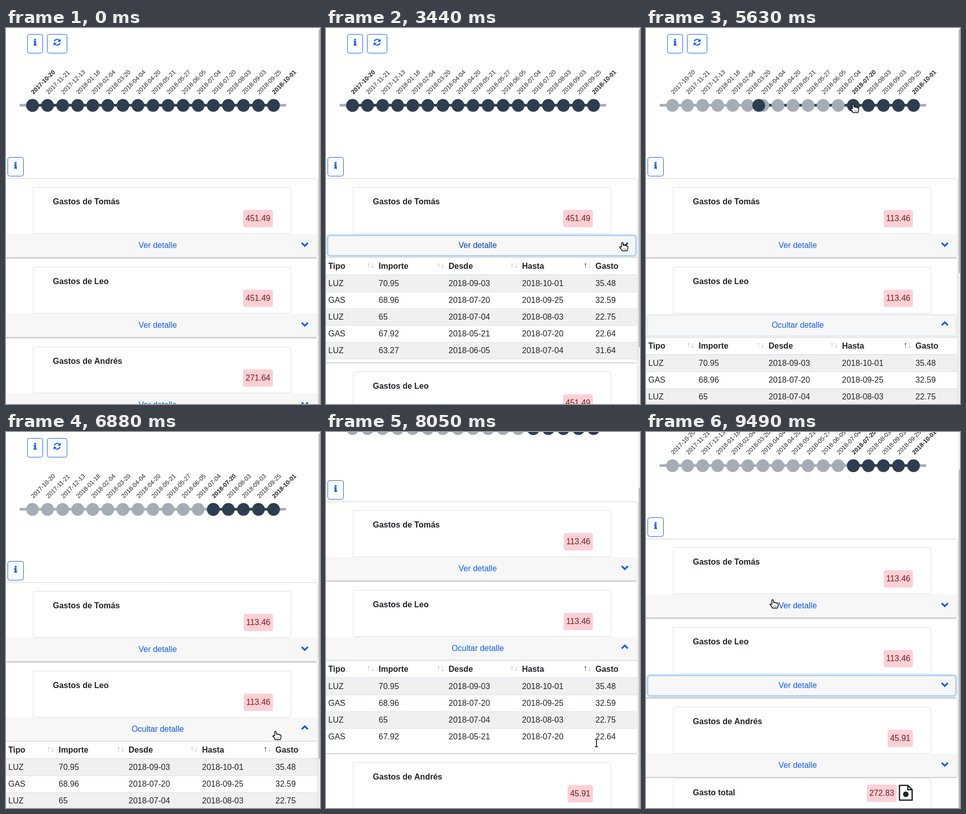
Write an HTML page with a canvas that moves like this. It is 620 by 740 pixels and loops after 9.59 s.

```html
<!DOCTYPE html>
<html lang="es">
<head>
<meta charset="utf-8">
<style>
  html, body { margin: 0; width: 100%; height: 100%; overflow: hidden; background: #fff; }
  canvas { display: block; }
</style>
</head>
<body>
<canvas id="stage" width="620" height="740"></canvas>
<script>
const LOOP = 9590, W = 620, H = 740;
const BLUE = '#0f5ef7', INK = '#212529', NAVY = '#2c3e50', GREY = '#a4acb6', LINE = '#dfdfdf';
const FONT = '"Liberation Sans", Arial, sans-serif';
const ctx = document.getElementById('stage').getContext('2d');

const dates = ('2017-10-20 2017-11-21 2017-12-13 2018-01-18 2018-02-04 2018-03-20 2018-04-04 2018-04-20 ' +
  '2018-05-21 2018-05-27 2018-06-05 2018-07-04 2018-07-20 2018-08-03 2018-09-03 2018-09-25 2018-10-01').split(' ');
const columns = [['Tipo', 4.5], ['Importe', 104], ['Desde', 242], ['Hasta', 387], ['Gasto', 532]];
const rows = [
  'LUZ 70.95 2018-09-03 2018-10-01 35.48',
  'GAS 68.96 2018-07-20 2018-09-25 32.59',
  'LUZ 65 2018-07-04 2018-08-03 22.75',
  'GAS 67.92 2018-05-21 2018-07-20 22.64',
  'LUZ 63.27 2018-06-05 2018-07-04 31.64',
  'LUZ 59.84 2018-05-27 2018-06-05 29.92',
  'GAS 72.15 2018-03-20 2018-05-21 36.08',
  'LUZ 66.41 2018-04-04 2018-05-21 33.21'
].map(r => r.split(' '));
const people = [['Tomás', '451.49', '113.46'], ['Leo', '451.49', '113.46'], ['Andrés', '271.64', '45.91']];

// Pointer path: time, x, y of the pointer's middle
const path = [
  [1130, 577, 416], [1300, 584, 434], [1460, 588, 430], [3700, 588, 430], [4230, 581, 595],
  [4790, 581, 595], [5360, 412, 158], [6210, 412, 158], [6880, 535, 596], [7060, 517, 724],
  [7180, 517, 724], [7400, 517, 532], [7910, 517, 532], [8260, 560, 730], [8450, 565, 725],
  [8840, 588, 434], [8960, 593, 426], [9200, 593, 426], [9490, 253, 338]
];

const clamp = v => Math.max(0, Math.min(1, v));
const lerp = (a, b, p) => a + (b - a) * p;
const ramp = (t, start, length) => clamp((t - start) / length);

// cubic-bezier(.25, .1, .25, 1)
function ease(x) {
  if (x <= 0 || x >= 1) return clamp(x);
  let lo = 0, hi = 1, u;
  for (let i = 0; i < 16; i++) {
    u = (lo + hi) / 2;
    if (.75 * u * (1 - u) + u ** 3 < x) lo = u; else hi = u;
  }
  return .3 * u * (1 - u) ** 2 + 3 * u * u * (1 - u) + u ** 3;
}
const easeAt = (t, start, length) => ease(ramp(t, start, length));

const isOpen = (i, t) => i === 0 ? t >= 2110 && t < 3320 : i === 1 && t >= 4420 && t < 9165;
const rowCount = t => t < 6210 ? 14 : 4;

function panelHeight(i, t) {
  const full = 50 + 33 * rowCount(t);
  if (i === 0) return t < 2110 ? 0 : full * (easeAt(t, 2099, 350) - easeAt(t, 3320, 350));
  if (i === 1) return t < 4420 ? 0 : full * (easeAt(t, 4409, 350) - easeAt(t, 9165, 350));
  return 0;
}

function focusRing(i, t) {
  if (i === 0) return t < 2110 || t >= 4420 ? 0 : t < 4270 ? 1 : .15;
  if (i === 2 || t < 4270) return 0;
  if (t < 4420) return .25;
  if (t < 9110) return 1 - ramp(t, 5490, 150);
  return .12 + .88 * ramp(t, 9150, 130);
}

function scrollTop(t) {
  const wheel = 159 * (1 - (1 - ramp(t, 7180, 340)) ** 4);
  return Math.round(t < 9110 ? wheel : Math.min(wheel, 86 + Math.round(panelHeight(1, t))));
}

function pointer(t) {
  if (t < path[0][0]) return null;
  const k = path.findIndex(p => p[0] > t);
  if (k < 0) return path[path.length - 1].slice(1);
  const [t0, x0, y0] = path[k - 1], [t1, x1, y1] = path[k], p = (t - t0) / (t1 - t0);
  return [lerp(x0, x1, p), lerp(y0, y1, p)];
}

function cardTop(i, t) {
  let y = 296;
  for (let k = 0; k < i; k++) y += 157 + Math.round(panelHeight(k, t));
  return y;
}

function over(i, t) {
  const p = pointer(t);
  if (!p) return false;
  const y = p[1] + scrollTop(t) - cardTop(i, t);
  return y > 109 && y < 156;
}

function hover(i, t) {
  let sum = 0;
  for (let k = 1; k <= 6; k++) sum += over(i, t - 25 * k);
  return sum / 6;
}

function text(s, x, y, color = INK, bold = false, align = 'left', size = 16) {
  ctx.font = `${bold ? 'bold ' : ''}${size}px ${FONT}`;
  ctx.textAlign = align;
  ctx.fillStyle = color;
  ctx.fillText(s, x, y);
}
function rect(x, y, w, h, color) {
  ctx.fillStyle = color;
  ctx.fillRect(x, y, w, h);
}
function box(x, y, w, h, r, stroke, fill, width = 1) {
  ctx.beginPath();
  ctx.roundRect(x, y, w, h, r);
  if (fill) { ctx.fillStyle = fill; ctx.fill(); }
  if (stroke) { ctx.strokeStyle = stroke; ctx.lineWidth = width; ctx.stroke(); }
}
function disc(x, y, r, color) {
  ctx.beginPath();
  ctx.arc(x, y, r, 0, 7);
  ctx.fillStyle = color;
  ctx.fill();
}
function shape(d, x, y, stroke, width, fill) {
  const p = new Path2D(d);
  ctx.save();
  ctx.translate(x, y);
  if (fill) { ctx.fillStyle = fill; ctx.fill(p); }
  if (stroke) { ctx.strokeStyle = stroke; ctx.lineWidth = width; ctx.stroke(p); }
  ctx.restore();
}

function infoButton(x, y, w) {
  box(x + .5, y + .5, w - 1, 37, 4, BLUE);
  const cx = x + w / 2;
  disc(cx, y + 11.2, 2, BLUE);
  shape('M-3 -3H1.8V3.7H3V6H-3V3.7H-1.8V-.7H-3Z', cx, y + 16.7, null, 0, BLUE);
}

function refreshButton() {
  box(81.5, 12.5, 39, 37, 4, BLUE);
  shape('M-5.6 -1.2A5.6 5.6 0 0 1 4.4 -3.4M5.6 1.2A5.6 5.6 0 0 1 -4.4 3.4', 101, 28, BLUE, 2);
  shape('M7 -7V-1H1ZM-7 7V1H-1Z', 101, 28, null, 0, BLUE);
}

function timeline(t) {
  const first = t < 5490 ? 0 : 12, dotX = i => 52.3 + 29.75 * i;
  const left = lerp(dotX(0), dotX(12), easeAt(t, 5490, 500));
  rect(27, 149.5, 526, 5, GREY);
  rect(left, 149.5, dotX(16) - left, 5, NAVY);
  dates.forEach((d, i) => {
    disc(dotX(i), 152.3, 12.5, i < first ? GREY : NAVY);
    ctx.save();
    ctx.translate(dotX(i) + 2, 131);
    ctx.rotate(-Math.PI / 4);
    text(d, 0, 0, INK, i === first || i === 16, 'left', 12);
    ctx.restore();
  });
  disc(left, 152.3, 12.5, NAVY);
}

function badge(value, right, y) {
  ctx.font = `16px ${FONT}`;
  const w = ctx.measureText(value).width + 10;
  box(right - w, y, w, 34, 4, null, '#fdd0d6');
  text(value, right - 5, y + 22, '#721c24', false, 'right');
}

function table(y, count) {
  columns.forEach(([name, x], i) => {
    text(name, x, y + 22, INK, true);
    if (i === 0) return;
    text('↑', x - 24, y + 20, i === 4 ? INK : '#b4b4b4');
    text('↓', x - 16, y + 20, '#b4b4b4');
  });
  rect(0, y + 33, 615, 1.5, '#cfe2f3');
  rows.slice(0, count).forEach((r, i) => {
    const top = y + 35 + 33 * i;
    if (i % 2 === 0) rect(0, top, 615, 32, '#f0f0f0');
    if (i) rect(0, top - 1, 615, 1, '#d3e4f3');
    r.forEach((cell, c) => text(cell, columns[c][1], top + 21));
  });
}

function card(i, t) {
  const y = cardTop(i, t), extra = Math.round(panelHeight(i, t));
  const [name, before, after] = people[i];
  const h = hover(i, t), ring = focusRing(i, t);
  const color = `rgb(${lerp(15, 8, h)},${lerp(94, 66, h)},${lerp(247, 178, h)})`;

  box(-4.5, y + .5, 620, 156 + extra, 4, '#d4d4d4', '#fff');
  box(53.5, y + 17.5, 509, 91, 3, LINE);
  text('Gastos de ' + name, 92.5, y + 51, INK, true);
  badge(t < 5490 ? before : after, 527, y + 62);
  rect(0, y + 109, 615, 46, '#f7f7f7');
  rect(0, y + 155, 615, 1, '#c9c9c9');

  if (extra > 0) {
    ctx.save();
    ctx.beginPath();
    ctx.rect(0, y + 156, 615, extra);
    ctx.clip();
    table(y + 156, rowCount(t));
    ctx.restore();
  }
  if (ring > 0) {
    ctx.globalAlpha = .5 + .5 * ring;
    box(3, y + 112, 609, 40.5, 5, '#a9d0f5', null, 1 + 2 * ring);
    ctx.globalAlpha = 1;
  }
  text(isOpen(i, t) ? 'Ocultar detalle' : 'Ver detalle', 299.5, y + 137, color, false, 'center');
  shape(isOpen(i, t) ? 'M-6 2L0 -4L6 2' : 'M-6 -3L0 3L6 -3', 590, y + 130, color, 3.2);
}

function totalCard(y, t) {
  box(53.5, y + 1.5, 509, 91, 3, LINE);
  text('Gasto total', 92.5, y + 34, INK, true);
  badge(t < 5490 ? '1174.62' : '272.83', 495, y + 13);
  shape('M1.5 1.5H18L26.5 10V30.5H1.5ZM18 1.5V10H26.5', 499, y + 13, INK, 2.6);
  disc(513, y + 32, 5.5, INK);
}

function scrollbar(t, top) {
  const view = 955, page = 1160 + 1.45 * (panelHeight(0, t) + panelHeight(1, t));
  rect(616, 0, 4, H, '#f1f1f1');
  box(617.5, 3 + top * view / page, 4, view * view / page, 1, null, '#b9b9b9');
}

function drawPointer(t, top) {
  const p = pointer(t);
  if (!p) return;
  const x = Math.round(p[0]), y = Math.round(p[1]), pageY = y + top;
  const tableTop = cardTop(1, t) + 156;
  if (isOpen(1, t) && pageY > tableTop && pageY < tableTop + panelHeight(1, t)) {
    const beam = 'M-3 -7.5H-1L0 -6.5L1 -7.5H3M0 -6.5V6.5M-3 7.5H-1L0 6.5L1 7.5H3';
    shape(beam, x, y, '#fff', 3.5);
    shape(beam, x, y, '#000', 1.5);
  } else if (pageY < 170 || people.some((_, i) => over(i, t))) {
    shape('M-4.5 1V-6.5Q-4.5 -8 -3 -8Q-1.5 -8 -1.5 -6.5V-2.5H.5Q1.5 -3 2 -2H4Q5 -2 5.3 -1H6.5Q8 -1 8 1V4L6.5 8.5H-3.5L-5 5L-8 2.5Q-8.5 .5 -6.5 .5Z',
      x, y, '#000', 1.4, '#fff');
    shape('M-1 4V6M1.5 4V6M4 4V6', x, y, '#000', .7);
  } else {
    shape('M-4 -8V6L-1 3.5L1 8L3.5 7L1.5 2.5H6Z', x, y, '#fff', 1, '#000');
  }
}

function draw(t) {
  const top = scrollTop(t);
  rect(0, 0, W, H, '#fff');
  ctx.save();
  ctx.translate(0, -top);
  infoButton(42, 12, 31);
  refreshButton();
  timeline(t);
  infoButton(3, 254, 32);
  people.forEach((_, i) => card(i, t));
  totalCard(cardTop(3, t), t);
  ctx.restore();
  scrollbar(t, top);
  drawPointer(t, top);
}

const start = performance.now();
function loop() {
  draw((performance.now() - start) % LOOP);
  requestAnimationFrame(loop);
}
loop();
</script>
</body>
</html>
```
